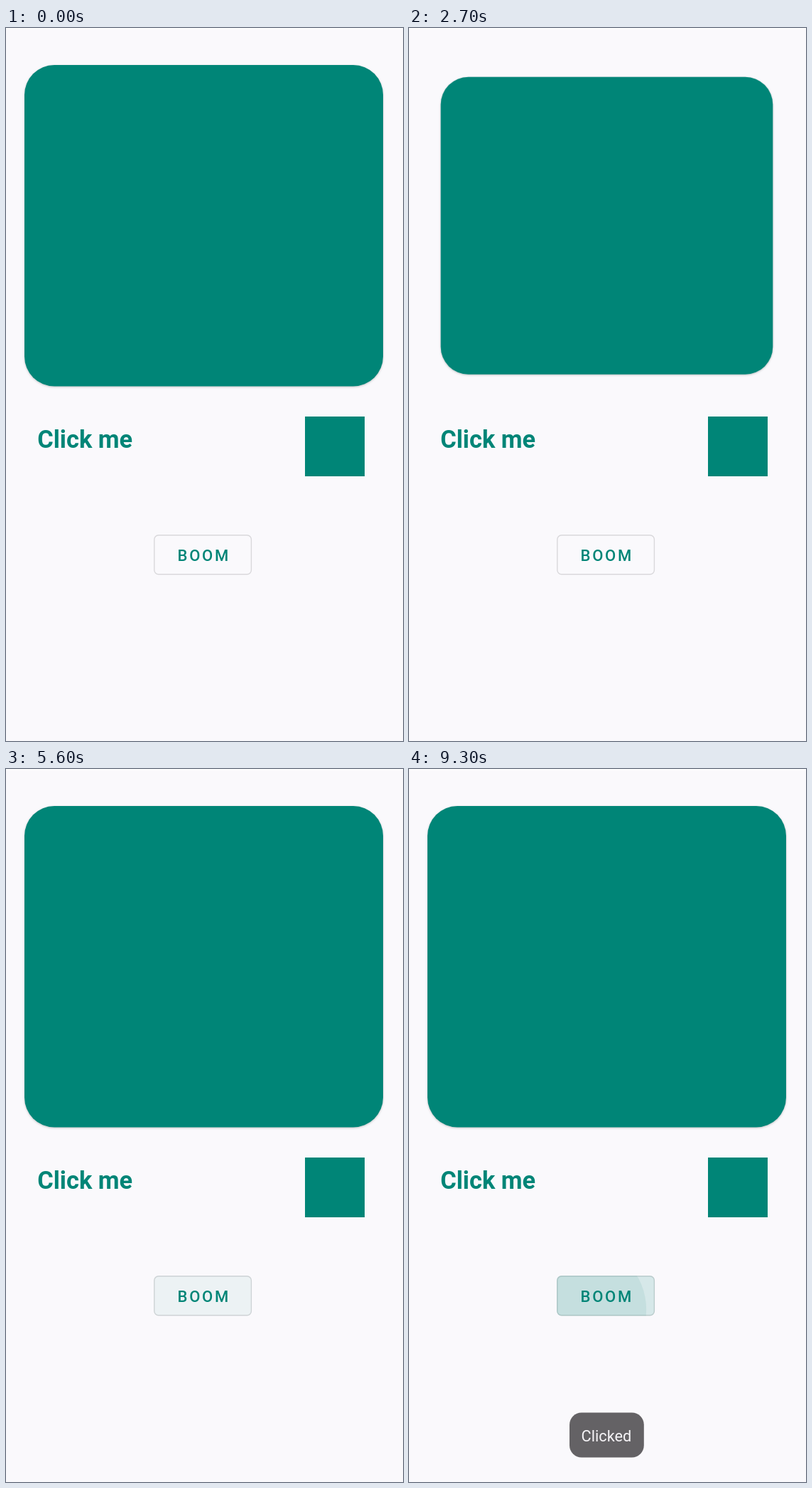
An HTML page that plays this animation: 559 by 1002 pixels, repeating every 9.4 s.

```html
<!DOCTYPE html>
<html lang="en">
<head>
<meta charset="utf-8">
<title>Press animations</title>
<style>
  html, body { margin: 0; width: 100%; height: 100%; overflow: hidden; background: #faf9fc; }
  svg { display: block; width: 100%; height: 100%; }
  text { font-family: Roboto, sans-serif; }
  .teal { fill: #008577; }

  .card, .icon, .label, .toast, .tint, .wave {
    animation: 9400ms linear infinite;
    animation-timing-function: ease-in-out;
  }
  .card  { animation-name: card;  transform-origin: 278.3px 278px; filter: drop-shadow(0 1px 1.5px rgba(0, 0, 0, .22)); }
  .icon  { animation-name: icon;  transform-origin: 463px 588px; }
  .label { animation-name: label; transform-origin: 112px 578px; font-size: 34.4px; font-weight: 700; }
  .toast { animation-name: toast; }
  .tint  { animation-name: tint; animation-timing-function: linear; }
  .wave  { animation-name: wave; animation-timing-function: linear; }

  .boom { font-size: 22px; font-weight: 500; letter-spacing: 2.7px; }
  .note { font-size: 21.74px; fill: #f6f4f7; }

  @keyframes card {
    0%, 15.96%, 22.87%, 25.53%, 34.04%, 100% { transform: scale(1); }
    19.15%, 28.72%, 29.79% { transform: scale(.926); }
  }
  @keyframes icon {
    0%, 35.11%, 42.55%, 43.62%, 51.06%, 100% { transform: scale(1); }
    38.83%, 47.34% { transform: scale(.926); }
  }
  @keyframes label {
    0%, 75.53%, 81.91%, 87.23%, 93.62%, 100% { transform: scale(1); }
    78.72%, 90.43% { transform: scale(.926); }
  }
  @keyframes toast {
    0%, 76.6% { opacity: 0; }
    79.79%, 100% { opacity: 1; }
  }
  @keyframes tint {
    0%, 52.13%, 61.7%, 63.83%, 73.94%, 94.68% { opacity: 0; }
    54.79%, 56.38%, 66.49%, 69.15%, 97.87%, 100% { opacity: .144; }
    59.57% { opacity: .055; }
  }
  @keyframes wave {
    0%, 52.13% { transform: translate(225px, 766px) scale(0); opacity: .08; }
    56.38% { transform: translate(240px, 760px) scale(94); opacity: .08; }
    58.5% { transform: translate(270px, 742px) scale(140); opacity: 0; }
    58.51%, 63.83% { transform: translate(225px, 766px) scale(0); opacity: .08; }
    68.09% { transform: translate(240px, 760px) scale(94); opacity: .08; }
    71.5% { transform: translate(270px, 742px) scale(140); opacity: 0; }
    71.51%, 94.68% { transform: translate(225px, 766px) scale(0); opacity: .08; }
    98.94% { transform: translate(240px, 760px) scale(94); opacity: .08; }
    100% { transform: translate(248px, 755px) scale(108); opacity: .08; }
  }
</style>
</head>
<body>
<svg viewBox="0 0 559 1002" preserveAspectRatio="none">
  <defs>
    <clipPath id="button"><rect x="208" y="712" width="138" height="56.5" rx="6.5"/></clipPath>
  </defs>
  <rect width="559" height="1002" fill="#faf9fc"/>
  <rect width="559" height="2" fill="#fefefe"/>

  <rect class="card teal" x="26" y="52" width="505" height="451.5" rx="42"/>
  <text class="label teal" x="44.2" y="590">Click me</text>
  <rect class="icon teal" x="421" y="546" width="84" height="84"/>

  <rect x="208.8" y="712.8" width="136.6" height="55" rx="6" fill="none" stroke="#d9d8db" stroke-width="1.4"/>
  <g clip-path="url(#button)">
    <rect class="tint teal" x="208" y="712" width="138" height="57"/>
    <circle class="wave teal" r="1"/>
  </g>
  <text class="boom teal" x="241.6" y="749">BOOM</text>

  <g class="toast">
    <rect x="226" y="904.5" width="104.8" height="63" rx="17" fill="#646265"/>
    <text class="note" x="242.6" y="944.5">Clicked</text>
  </g>
</svg>
</body>
</html>
```
